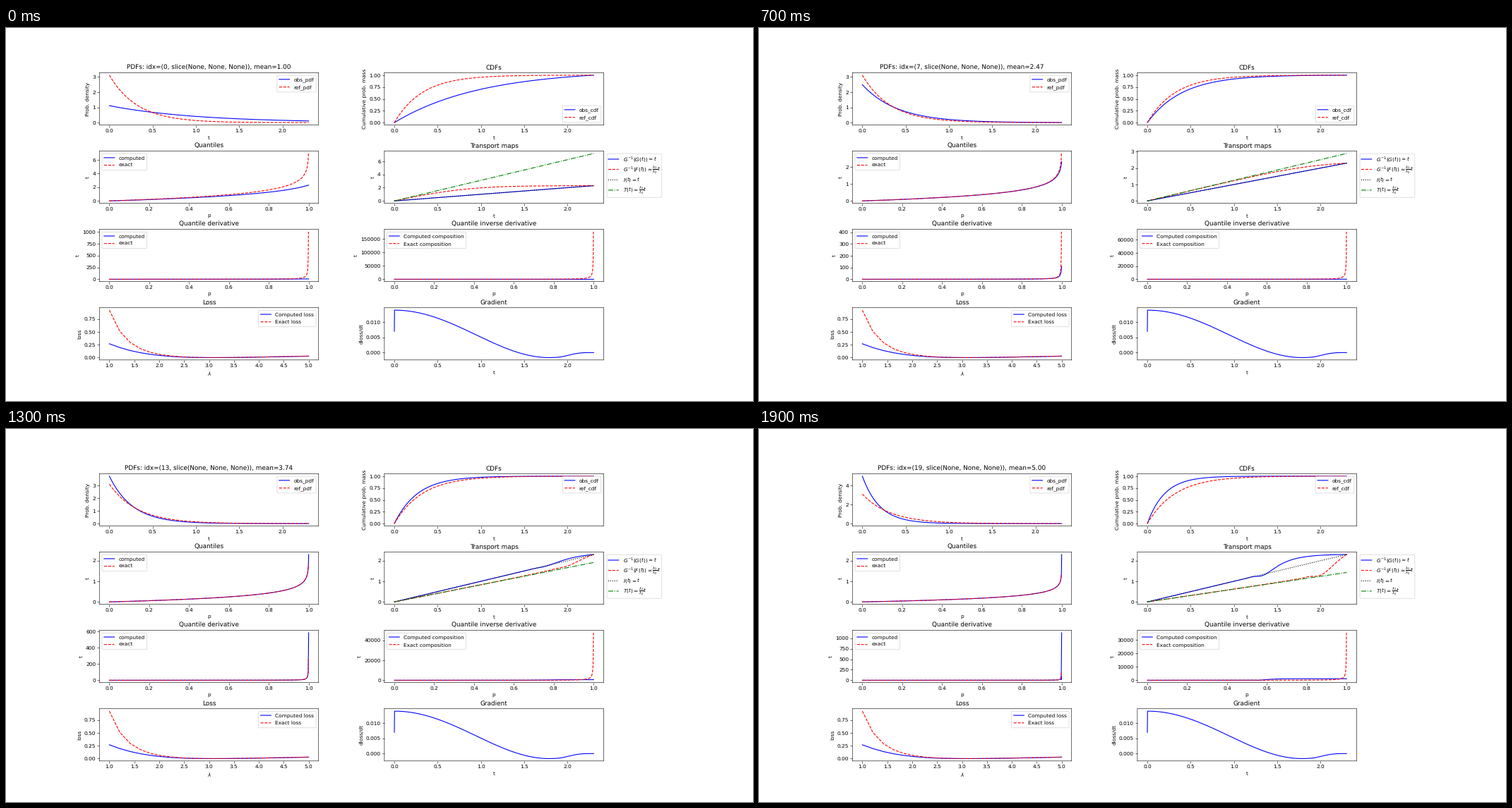
These frames come from a looping animation (1058x529 px, 2 s). A matplotlib script:

```python
import numpy as np
import matplotlib.pyplot as plt
from matplotlib.animation import FuncAnimation

# Keep thin lines and small text at their true fractional positions
plt.rcParams.update({"path.snap": False, "text.hinting": "none",
                     "legend.labelspacing": 0.53})

N = 1000
FRAMES = 20
T_MAX = np.log(1000) / 3
RATES = np.linspace(1, 5, FRAMES)
REF = RATES[10]

t = np.linspace(0, T_MAX, N)
p = np.linspace(0, 1, N)


def mass(rate):
    """Probability of an exponential variable inside [0, T_MAX]."""
    return 1 - np.exp(-rate * T_MAX)


def pdf(rate):
    return rate * np.exp(-rate * t) / mass(rate)


def cdf(rate):
    return (1 - np.exp(-rate * t)) / mass(rate)


def quantile(rate):
    return -np.log(1 - p * mass(rate)) / rate


def spline_slopes(y):
    """Knot slopes of natural cubic splines on uniform knots over [0, 1]."""
    n = len(y)
    a = 4 * np.eye(n) + np.eye(n, k=1) + np.eye(n, k=-1)
    a[0, 0] = a[-1, -1] = 2
    rhs = np.empty_like(y)
    rhs[1:-1] = y[2:] - y[:-2]
    rhs[0], rhs[-1] = y[1] - y[0], y[-1] - y[-2]
    return np.linalg.solve(a, 3 * (n - 1) * rhs)


def spline_eval(y, m, x):
    """Value and derivative of the spline at x."""
    n = len(y) - 1
    k = np.clip((x * n).astype(int), 0, n - 1)
    s = np.clip(x * n - k, 0, 1)
    y0, dy = y[k], y[k + 1] - y[k]
    m0, m1 = m[k] / n, m[k + 1] / n
    b, c = 3 * dy - 2 * m0 - m1, m0 + m1 - 2 * dy
    return y0 + s * (m0 + s * (b + s * c)), n * (m0 + s * (2 * b + 3 * s * c))


quantiles = np.stack([quantile(r) for r in RATES], axis=1)
slopes = spline_slopes(quantiles)
ref_pdf, ref_cdf = pdf(REF), cdf(REF)
transports = [spline_eval(q, m, ref_cdf)[0]
              for q, m in zip(quantiles.T, slopes.T)]

fig, axes = plt.subplots(4, 2, figsize=(20, 10), dpi=52.9)
fig.subplots_adjust(left=0.125, right=0.8, bottom=0.11, top=0.88,
                    wspace=0.3, hspace=0.5)
(ax_pdf, ax_cdf), (ax_q, ax_map), (ax_dq, ax_comp), (ax_loss, ax_grad) = axes


def panel(ax, title, xlabel, ylabel, *curves):
    """Label the axes and return one line per (style, label)."""
    ax.set(title=title, xlabel=xlabel, ylabel=ylabel)
    return [ax.plot([], [], style, label=label)[0] for style, label in curves]


def fill(ax, lines, *data):
    for line, xy in zip(lines, data):
        line.set_data(*xy)
    ax.relim()
    ax.autoscale_view()


pdf_lines = panel(ax_pdf, "", "t", "Prob. density",
                  ("b-", "obs_pdf"), ("r--", "ref_pdf"))
cdf_lines = panel(ax_cdf, "CDFs", "t", "Cumulative prob. mass",
                  ("b-", "obs_cdf"), ("r--", "ref_cdf"))
q_lines = panel(ax_q, "Quantiles", "p", "t",
                ("b-", "computed"), ("r--", "exact"))
map_lines = panel(ax_map, "Transport maps", "t", "t",
                  ("b-", r"$G^{-1}(G(t)) \approx t$"),
                  ("r--", r"$G^{-1}(F(t)) \approx \frac{\lambda_1}{\lambda_2} t$"),
                  ("k:", r"$I(t) = t$"),
                  ("g-.", r"$T(t) = \frac{\lambda_1}{\lambda_2} t$"))
dq_lines = panel(ax_dq, "Quantile derivative", "p", "t",
                 ("b-", "computed"), ("r--", "exact"))
comp_lines = panel(ax_comp, "Quantile inverse derivative", "p", "t",
                   ("b-", "Computed composition"), ("r--", "Exact composition"))
loss_lines = panel(ax_loss, "Loss", r"$\lambda$", "loss",
                   ("b-", "Computed loss"), ("r--", "Exact loss"))
grad_lines = panel(ax_grad, "Gradient", "t", "dloss/dt", ("b-", None))

for ax in (ax_pdf, ax_cdf, ax_q, ax_dq, ax_comp, ax_loss):
    ax.legend(loc="best")
# Formulas carry their own padding, so this legend is set tighter
ax_map.legend(loc="upper left", bbox_to_anchor=(1.003, 1),
              labelspacing=0.25, borderpad=0.27)

# Panels that stay the same throughout
loss = np.mean((quantiles - quantiles[:, [10]]) ** 2, axis=0)
fill(ax_loss, loss_lines, (RATES, loss),
     (RATES, 2 * (1 / RATES - 1 / REF) ** 2))

# Gradient of the summed loss: tail integral of the total displacement
drift = np.sum(transports, axis=0) - FRAMES * t
grad = 2 * t[1] ** 2 * np.cumsum(drift[::-1])[::-1]
grad[0] /= 2
fill(ax_grad, grad_lines, (t, grad))


def update(i):
    rate = RATES[i]
    q, m = quantiles[:, i], slopes[:, i]
    obs_cdf = cdf(rate)
    identity, composed = spline_eval(q, m, obs_cdf)
    inner = p[:-1]  # the exact quantile diverges at p = 1

    ax_pdf.set_title(f"PDFs: idx=({i}, {slice(None)}), mean={rate:.2f}")
    fill(ax_pdf, pdf_lines, (t, pdf(rate)), (t, ref_pdf))
    fill(ax_cdf, cdf_lines, (t, obs_cdf), (t, ref_cdf))
    fill(ax_q, q_lines, (p, q), (inner, -np.log(1 - inner) / rate))
    fill(ax_map, map_lines, (t, identity), (t, transports[i]), (t, t),
         (t, REF / rate * t))
    fill(ax_dq, dq_lines, (p, m), (inner, 1 / (rate * (1 - inner))))
    fill(ax_comp, comp_lines, (p, composed),
         (inner, 1 / (rate * (1 - ref_cdf[:-1]))))
    return []


anim = FuncAnimation(fig, update, frames=FRAMES, init_func=lambda: update(0),
                     interval=100, repeat=True, repeat_delay=0)
plt.show()
```
